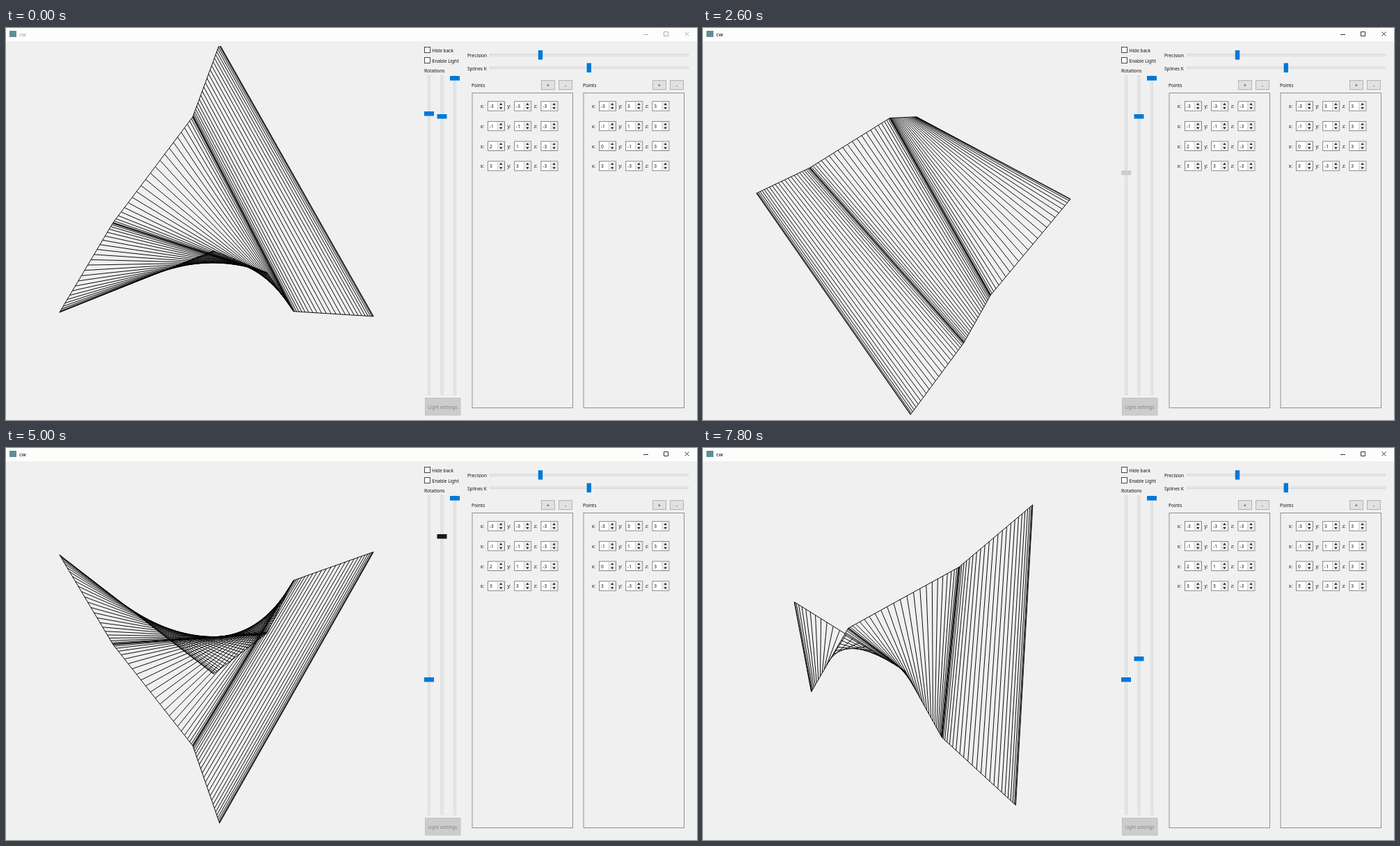
These frames come from a looping animation (993x564 px, 8000 ms). An HTML page:

```html
<!DOCTYPE html>
<html lang="en">
<head>
<meta charset="utf-8">
<title>cw</title>
<style>
  html, body { margin: 0; width: 100%; height: 100%; overflow: hidden; background: #f0f0f0; }
  svg { display: block; width: 993px; height: 564px; }
  text { font: 6.6px "Noto Sans", "Open Sans", sans-serif; fill: #111; white-space: pre; }
</style>
</head>
<body>
<svg id="stage" viewBox="0 0 993 564">
  <defs><clipPath id="view"><rect x="9" y="26" width="587" height="532"/></clipPath></defs>
  <rect width="993" height="564" fill="#f0f0f0"/>
  <g clip-path="url(#view)">
    <path id="mesh" fill="none" stroke="#000" stroke-width="0.95"/>
  </g>
  <g id="ui"></g>
</svg>
<script>
const LOOP = 8000, STEP = 100;
const SCALE = 53.2, CX = 302.5, CY = 292, PARTS = 25;
const BLUE = '#0078d7', DARK = '#171717', GREY = '#cccccc';
const curveA = [[-3, -3, -3], [-1, -1, -3], [2, 1, -3], [3, 3, -3]];
const curveB = [[-3, 3, 3], [-1, 1, 3], [0, -1, 3], [3, -3, 3]];

// Each drag: start time, then one angle per step
const dragX = [
  [0, 41.2],
  [1900, 45, 55, 66, 76, 86, 95.5, 103, 108.3],
  [2900, 112, 121, 132, 144, 156, 166, 174],
  [3700, 183.2, 194, 204, 209.5, 208.4]
];
const dragY = [
  [0, 43.9],
  [5400, 46, 50, 55, 60.5, 74, 91, 108, 122, 132],
  [6500, 139, 152, 166.7, 176, 182, 184.4]
];
const stateX = [[0, BLUE], [800, DARK], [1600, GREY], [4100, DARK], [4200, BLUE]];
const stateY = [[0, BLUE], [5000, DARK], [5200, GREY], [7000, DARK], [7100, BLUE]];

const latest = (list, t) => list.filter(e => e[0] <= t).pop();
function angleAt(drags, t) {
  const [start, ...angles] = latest(drags, t);
  return angles[Math.min(angles.length - 1, Math.floor((t - start) / STEP))];
}

// ---- interface ----
const ui = document.getElementById('ui');
function add(tag, attrs, content) {
  const el = document.createElementNS('http://www.w3.org/2000/svg', tag);
  for (const k in attrs) el.setAttribute(k, attrs[k]);
  if (content !== undefined) el.textContent = content;
  ui.appendChild(el);
  return el;
}
const box = (x, y, width, height, fill, stroke = 'none') =>
  add('rect', { x, y, width, height, fill, stroke, 'stroke-width': 0.9 });
const label = (x, y, s, attrs = {}) => add('text', { x, y, ...attrs }, s);
const line = (d, stroke = '#000') => add('path', { d, stroke, fill: 'none', 'stroke-width': 0.8 });

box(0, 0, 993, 19, '#fdfefc');
box(5, 4, 10, 9, '#5f8f93');
const caption = label(19, 12, 'cw', { style: 'font-size:7.6px' });
const winButtons = line('M916 9.5h7M945.5 5.5h6v6h-6zM975.5 5.5l6 6M981.5 5.5l-6 6');

[['Hide back', 27.5], ['Enable Light', 42.5]].forEach(([s, y]) => {
  box(601.5, y, 8, 8, '#fff', '#333');
  label(612.5, y + 7, s);
});
label(601, 63.5, 'Rotations');

const handles = [601, 619.5, 638].map(x => {
  box(x + 5.5, 68.5, 3, 459, '#e7eaea', '#d6d6d6');
  return box(x, 69, 14, 6.5, BLUE);
});
box(602.5, 532.5, 50.5, 24.5, '#cccccc', '#bfbfbf');
label(627.5, 548, 'Light settings', { 'text-anchor': 'middle', style: 'fill:#838383' });

[['Precision', 38.8, 768], ['Splines K', 57.2, 837.8]].forEach(([s, y, x]) => {
  label(663, y + 3.6, s);
  box(695.5, y - 1.3, 285, 2.6, '#e7eaea', '#d6d6d6');
  box(x - 3.2, y - 6.7, 6.4, 13.4, BLUE);
});

function button(x, s) {
  box(x, 75.5, 19, 13, '#e1e1e1', '#adadad');
  label(x + 9.5, 84.6, s, { 'text-anchor': 'middle' });
}

function spin(x, y, value) {
  const frame = box(x, y - 6.7, 24, 13.4, '#fff', '#7a7a7a');
  const buttons = box(x + 13.8, y - 6, 9.6, 12, '#ececec');
  line(`M${x + 13.8} ${y - 6}v12`, '#c8c8c8');
  add('path', {
    d: `M${x + 16.5} ${y - 1.7}h4.4l-2.2 -2.7zM${x + 16.5} ${y + 1.7}h4.4l-2.2 2.7z`, fill: '#111'
  });
  label(x + 2.4, y + 2.7, value);
  return { frame, buttons };
}

function panel(dx, points) {
  label(669 + dx, 84.6, 'Points');
  button(769.5 + dx, '+');
  button(794.5 + dx, '-');
  box(670 + dx, 93.5, 144.5, 453, '#f0f0f0', '#828790');
  return points.map((p, row) => p.map((v, col) => {
    const x = 692.5 + dx + col * 38.2, y = 112.4 + row * 28.7;
    label(x - (col ? 10.2 : 10.8), y + 2.8, 'xyz'[col] + ':');
    return spin(x, y, v);
  }));
}
const hovered = panel(0, curveA)[0][0];
panel(160, curveB);

// ---- surface ----
const smooth = u => u * u * (3 - 2 * u);
function sample(points) {
  const out = [];
  for (let s = 0; s < points.length - 1; s++)
    for (let i = s ? 1 : 0; i <= PARTS; i++) {
      const k = smooth(i / PARTS);
      out.push(points[s].map((v, c) => v + (points[s + 1][c] - v) * k));
    }
  return out;
}
const railA = sample(curveA), railB = sample(curveB);

function projector(ax, ay) {
  const rad = Math.PI / 180;
  const ca = Math.cos(ax * rad), sa = Math.sin(ax * rad);
  const cb = Math.cos(ay * rad), sb = Math.sin(ay * rad);
  return ([x, y, z]) => {
    const depth = z * cb - x * sb;
    const px = CX + SCALE * (x * cb + z * sb);
    const py = CY - SCALE * (y * ca - depth * sa);
    return `${px.toFixed(2)} ${py.toFixed(2)}`;
  };
}

function meshPath(ax, ay) {
  const project = projector(ax, ay);
  const a = railA.map(project), b = railB.map(project);
  const rulings = a.map((p, i) => `M${p}L${b[i]}`);
  return 'M' + a.join('L') + 'M' + b.join('L') + rulings.join('');
}

const mesh = document.getElementById('mesh');
let shown = -1;
function render(ms) {
  const t = Math.floor((ms % LOOP) / STEP) * STEP;
  if (t === shown) return;
  shown = t;
  const ax = angleAt(dragX, t), ay = angleAt(dragY, t);
  mesh.setAttribute('d', meshPath(ax, ay));
  [[ax, stateX], [ay, stateY]].forEach(([angle, states], i) => {
    handles[i].setAttribute('y', Math.round(68.6 + angle * 452 / 360));
    handles[i].setAttribute('fill', latest(states, t)[1]);
  });
  const ink = t < 1600 ? '#999' : '#000';
  caption.style.fill = ink;
  winButtons.setAttribute('stroke', ink);
  hovered.frame.setAttribute('stroke', t >= 7400 && t < 7800 ? DARK : '#7a7a7a');
  hovered.buttons.setAttribute('fill', t >= 7600 && t < 7800 ? '#e5f1fb' : '#ececec');
}

const begin = performance.now();
function tick() {
  render(performance.now() - begin);
  requestAnimationFrame(tick);
}
render(0);
requestAnimationFrame(tick);
</script>
</body>
</html>
```
